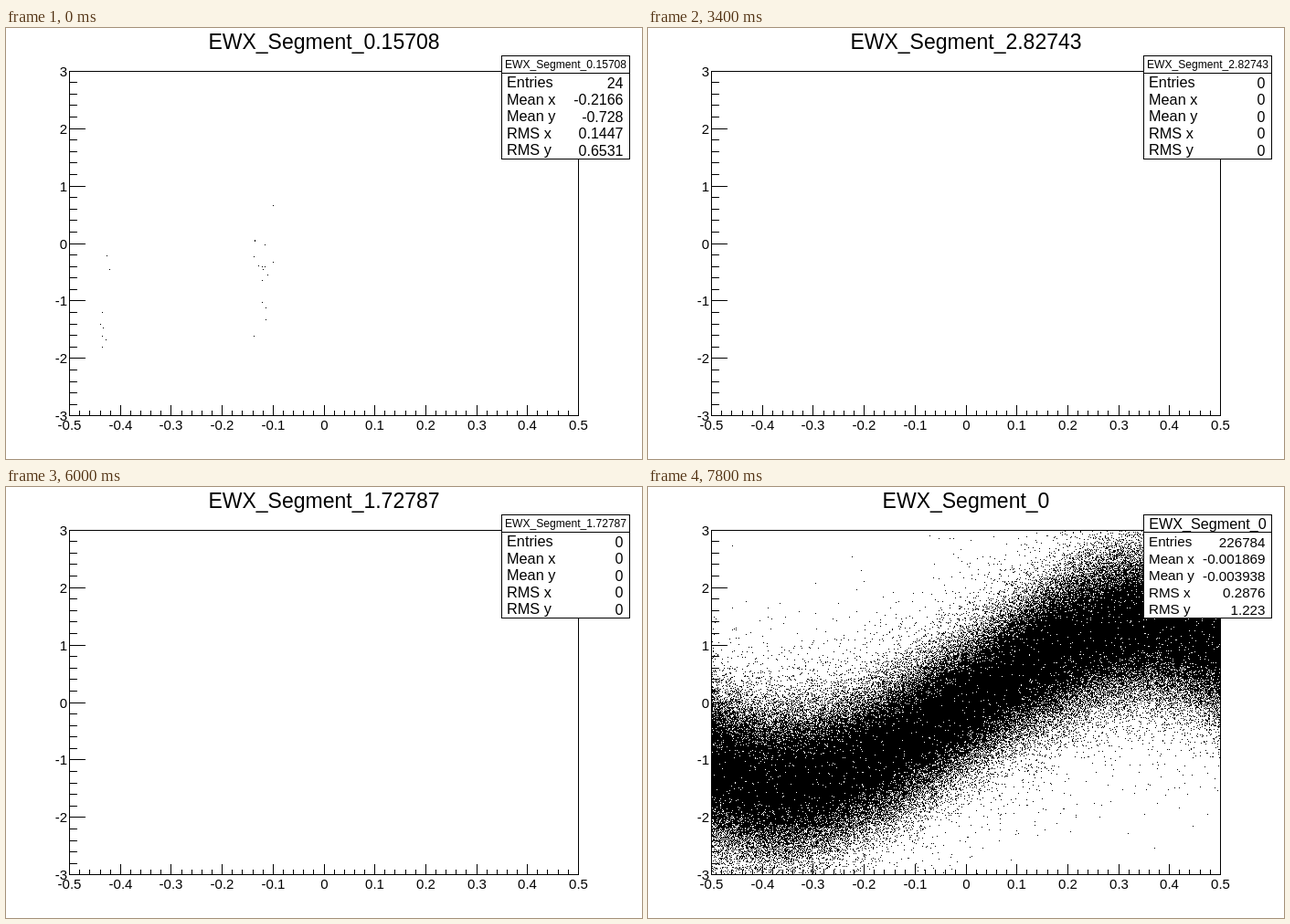
An HTML page with a canvas for the animation above (8000 ms loop, 696x472 px).

```html
<!DOCTYPE html>
<html lang="en">
<head>
<meta charset="utf-8">
<title>Segment scatter plots</title>
<style>
  html, body { margin: 0; width: 100%; height: 100%; overflow: hidden; background: #fff; }
  canvas, svg { position: absolute; left: 0; top: 0; width: 696px; height: 472px; }
  text { font-family: "Liberation Sans", Arial, sans-serif; fill: #000; }
  path, rect { stroke: #000; fill: none; shape-rendering: crispEdges; }
  .axis { font-size: 15px; }
  .mid { text-anchor: middle; }
  .end { text-anchor: end; }
</style>
</head>
<body>
<canvas id="dots" width="696" height="472"></canvas>
<svg id="plot" viewBox="0 0 696 472"></svg>
<script>
const W = 696, H = 472, STEP = 200, LOOP = 8000, SEGMENTS = 20;
const LEFT = 69, RIGHT = 626, TOP = 47, BOTTOM = 424;
const plot = document.getElementById('plot');
const ctx = document.getElementById('dots').getContext('2d');

function add(tag, attrs, content = '') {
  const el = document.createElementNS('http://www.w3.org/2000/svg', tag);
  for (const key in attrs) el.setAttribute(key, attrs[key]);
  el.textContent = content;
  return plot.appendChild(el);
}

// The plot leaves a margin of a tenth on every side; ticks snap down to whole pixels.
const alongAxis = (size, part) => Math.floor(size * (.1 + .8 * part)) + .5;

function drawAxes() {
  add('rect', { x: LEFT + .5, y: TOP + .5, width: RIGHT - LEFT, height: BOTTOM - TOP });
  let ticks = '';
  for (let i = 0; i <= 50; i++) {
    const x = alongAxis(W, i / 50);
    ticks += `M${x} ${BOTTOM}v${i % 5 ? -5 : -11}`;
    if (i % 5 === 0)
      add('text', { x, y: 440, class: 'axis mid' }, String((i - 25) / 50));
  }
  for (let i = 0; i <= 30; i++) {
    const y = alongAxis(H, i / 30);
    ticks += `M${LEFT} ${y}h${i % 5 ? 9 : 18}`;
    if (i % 5 === 0)
      add('text', { x: 67, y: y + 5.8, class: 'axis end' }, String(3 - i / 5));
  }
  add('path', { d: ticks });
}

function seededRandom(seed) {
  return () => {
    seed = (seed + 0x6D2B79F5) | 0;
    let t = Math.imul(seed ^ (seed >>> 15), 1 | seed);
    t = (t + Math.imul(t ^ (t >>> 7), 61 | t)) ^ t;
    return ((t ^ (t >>> 14)) >>> 0) / 4294967296;
  };
}

function scatter(points) {
  const image = new ImageData(W, H);
  for (const [x, y] of points) image.data[(y * W + x) * 4 + 3] = 255;
  return image;
}

// Gaussian band around a cubic curve, with a share of wide outliers.
function* cloud(seed, entries, spread, outliers) {
  const random = seededRandom(seed);
  for (let n = 0; n < entries; n++) {
    const x = random() - .5;
    const sigma = random() < outliers ? 1.1 : spread * (.53 + .2 * Math.abs(x));
    const gauss = Math.sqrt(-2 * Math.log(1 - random())) * Math.cos(2 * Math.PI * random());
    const y = 5.7 * (x - 2.43 * x ** 3) + sigma * gauss;
    if (Math.abs(y) < 3)
      yield [Math.floor(LEFT + 1 + (x + .5) * (RIGHT - LEFT - 1)),
             Math.floor(TOP + 1 + (3 - y) / 6 * (BOTTOM - TOP - 1))];
  }
}

const fewPoints = [
  [292, 194], [272, 232], [272, 233], [283, 237], [271, 250], [276, 260],
  [280, 261], [283, 261], [281, 264], [292, 256], [286, 270], [280, 276],
  [280, 300], [284, 306], [284, 319], [271, 337], [110, 249], [113, 264],
  [105, 311], [103, 324], [106, 328], [105, 337], [109, 341], [105, 349]
];

const empty = { image: scatter([]), stats: ['0', '0', '0', '0', '0'] };
const filled = {
  1: { image: scatter(fewPoints), stats: ['24', '-0.2166', '-0.728', '0.1447', '0.6531'] },
  20: { image: scatter(cloud(5, 60000, .7, 0)),
        stats: ['60000', '-0.001214', '-0.002867', '0.2883', '1.163'] },
  40: { image: scatter(cloud(9, 226784, 1, .045)),
        stats: ['226784', '-0.001869', '-0.003938', '0.2876', '1.223'] }
};

drawAxes();
const title = add('text', { x: 348, y: 23, class: 'mid', 'font-size': 23 });
add('rect', { x: 542.5, y: 30.5, width: 140, height: 113, style: 'fill:#fff' });
add('path', { d: 'M542 49.5h141' });
const boxTitle = add('text', { x: 612.5, class: 'mid' });
const rows = ['Entries', 'Mean x', 'Mean y', 'RMS x', 'RMS y'].map((label, i) => {
  const y = 65.3 + 18.5 * i;
  return [add('text', { x: 548, y }, label), add('text', { x: 675.5, y: y + .6, class: 'end' })];
});

// Six significant digits; exact halves go to the even digit.
function angleLabel(segment) {
  const nudge = segment === 3 ? -1e-9 : 1e-9;
  return segment ? String(+(segment * .1570795 + nudge).toPrecision(6)) : '0';
}

function show(index) {
  const { image, stats } = filled[index] || empty;
  const name = 'EWX_Segment_' + angleLabel(index % SEGMENTS);
  const boxSize = { 13: 16.2, 18: 12.7, 19: 12.1, 20: 11.3 }[name.length];
  const rowSize = stats[1].length > 8 ? 15.2 : 16.3;
  ctx.putImageData(image, 0, 0);
  title.textContent = boxTitle.textContent = name;
  boxTitle.setAttribute('font-size', boxSize);
  boxTitle.setAttribute('y', 40 + .36 * boxSize);
  rows.forEach(([label, value], i) => {
    label.setAttribute('font-size', rowSize);
    value.setAttribute('font-size', Math.min(rowSize, 16));
    value.textContent = stats[i];
  });
}

let shown = 0;
function tick() {
  const index = 1 + Math.floor(performance.now() % LOOP / STEP);
  if (index !== shown) show(shown = index);
  requestAnimationFrame(tick);
}
tick();
</script>
</body>
</html>
```
